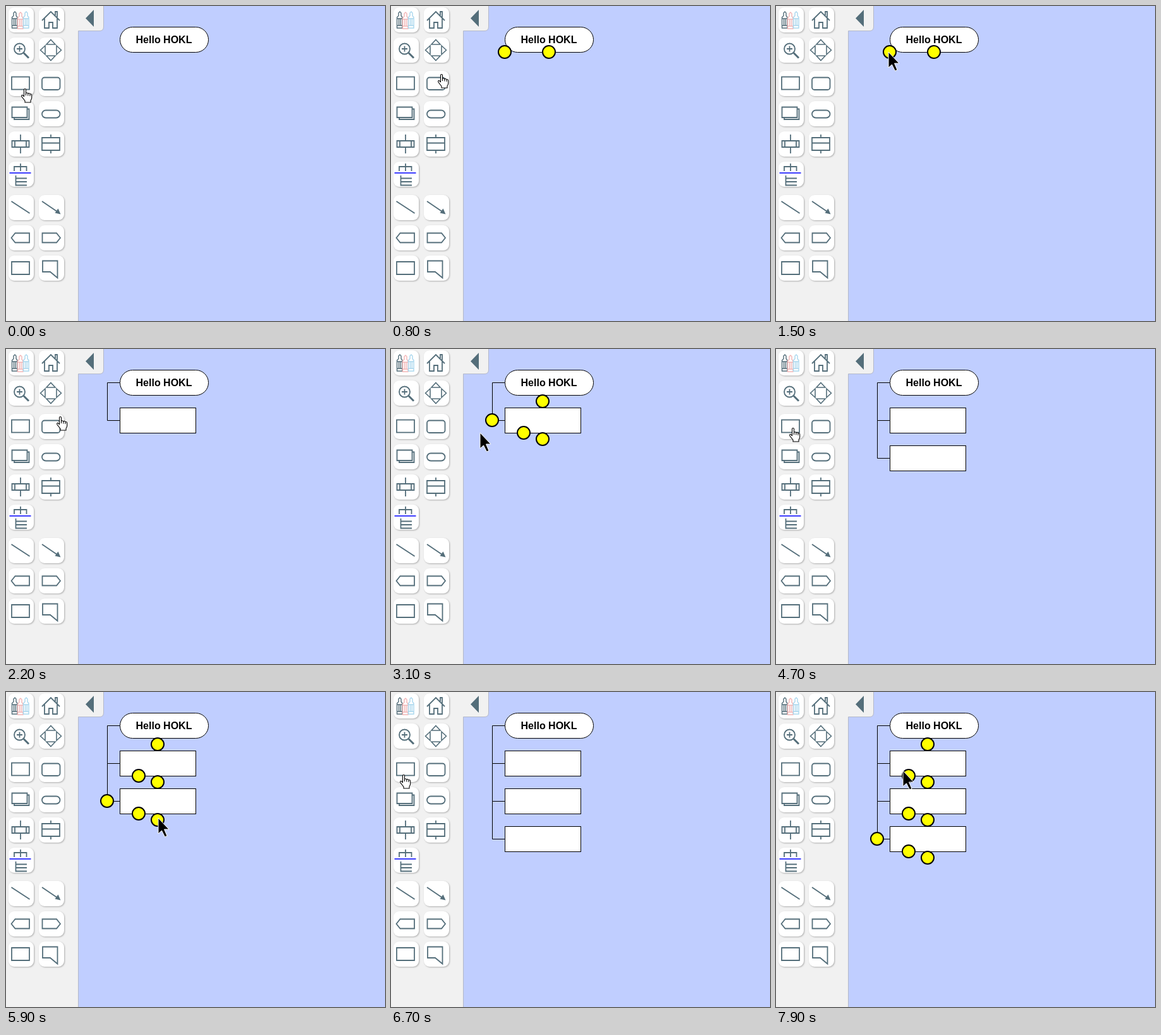
An HTML page that plays this animation: 600x500 px, repeating every 8000 ms.

```html
<!DOCTYPE html>
<html lang="en">
<head>
<meta charset="utf-8">
<title>Diagram editor</title>
<style>
  html, body { margin: 0; width: 100%; height: 100%; overflow: hidden; background: #c0ceff; }
  svg { display: block; }
  .button { fill: #fff; filter: drop-shadow(1px 1px 1.2px rgba(0, 0, 0, .28)); }
  .icons { fill: none; stroke: #546e7a; stroke-width: 1.8; }
  .node { fill: #fff; stroke: #000; }
  .link { fill: none; stroke: #000; }
  .spot { fill: #ff0; stroke: #000; stroke-width: 2; }
  text { font: bold 16px "Liberation Sans", Arial, sans-serif; text-anchor: middle; }
</style>
</head>
<body>
<svg width="600" height="500" viewBox="0 0 600 500">
  <rect width="600" height="500" fill="#c0ceff"/>
  <path d="M0 0H154.5V33Q154.5 39.5 148 39.5H114.5V500H0Z" fill="#f1f1f1"/>
  <path d="M154.5 0V33Q154.5 39.5 148 39.5H114.5V500" fill="none" stroke="#b4b8c8"/>
  <path d="M139 6V33L126 19.5Z" fill="#546e7a"/>
  <g id="buttons"></g>

  <g class="icons">
    <g stroke-width="1.4">
      <path id="crayon" d="M9.5 35V18L12 15.5V11L14 9L16 11V15.5L18 18V35ZM9.5 20H18M9.5 31H18M12.5 20V31M15.2 20V31"/>
      <use href="#crayon" x="9" y="1" stroke="#f3b6b6"/>
      <use href="#crayon" x="18" stroke="#a9d7ee"/>
    </g>
    <path d="M57 23L71 9L85 23M61 20V35H68V26H74V35H81V20M78 15V9H81V18"/>
    <g>
      <circle cx="21.500" cy="68" r="8.500"/>
      <path d="M17 68H26M21.500 63.500V72.500"/>
      <path d="M28 74.500L36 82.500" stroke-width="3"/>
    </g>
    <path d="M71 53.500L78 61H64ZM71 86.500L78 79H64ZM54.500 70L62 63V77ZM87.500 70L80 63V77Z" stroke-width="1.600"/>
    <rect x="9" y="112.500" width="28" height="20"/>
    <rect x="57" y="113.500" width="28.500" height="19.500" rx="4"/>
    <path d="M9.500 160.500H33.500V177H9.500ZM33.500 163.500H36.500V180H13V177"/>
    <rect x="57" y="165.500" width="28.500" height="12" rx="6"/>
    <path d="M9.500 214H36.500V224H9.500ZM14 214V224M32 214V224M23 204V214M23 224V234"/>
    <path d="M57 209H85V229H57ZM57 217.500H85M71 204V209M71 229V234"/>
    <path d="M23 250V262M13 262V255H32.500V262M15.500 269V284.500H33M15.500 273.500H33M15.500 279H33"/>
    <path d="M5.500 265H39.500" stroke="#3d3dff"/>
    <path d="M8.500 310L37.500 329M57 310L82 327"/>
    <path d="M86.500 330.500L77.500 328.500L82.500 321.500Z" fill="#546e7a" stroke="none"/>
    <path d="M8.500 368L14.500 360.500H37V375.500H14.500ZM86 368L80 360.500H57.500V375.500H80Z"/>
    <path d="M9 406H37V426H9ZM58 404.500H81.500V431.500L70 422H58Z"/>
  </g>

  <g id="diagram"></g>

  <path id="arrow" d="M0 0V25L5.500 20L10.500 30L14 28.500L9.500 18H17Z" fill="#000" stroke="#fff" stroke-width="1"/>
  <path id="hand" d="M-1.500 13V2Q-1.500 .5 0 .5T1.500 2V7.500Q3.200 5.800 4.800 8Q6.500 6.500 8 8.700Q10.700 8 10.700 11V15Q10.500 17 9 19V22H0V19.500L-5 13Q-6 10.500-4 10.300Q-2.500 11-1.500 13ZM1.500 7.500V11M4.800 8V11.500M8 8.700V12" fill="#fff" stroke="#000" stroke-width="1.100"/>
</svg>
<script>
const LOOP = 8000, STEP = 100;
const byId = id => document.getElementById(id);

const buttons = [2, 50, 103, 151, 199, 247, 300, 348, 396]
  .flatMap((y, row) => (row === 5 ? [4] : [4, 52]).map(x => ({ x, y })));
byId('buttons').innerHTML = buttons
  .map(({ x, y }) => `<rect class="button" x="${x}" y="${y}" width="40" height="40" rx="9"/>`).join('');

// Pointer positions: time, x, y
const pointerKeys = [
  [0, 30, 131], [300, 27, 127], [400, 27, 127], [1400, 178, 73], [1600, 177, 73],
  [2600, 36, 126], [2700, 36, 126], [3500, 246, 140], [3700, 246, 140],
  [4700, 27, 125], [4900, 27, 126], [5800, 241, 200], [6000, 241, 200],
  [6700, 20, 131], [6900, 20, 130], [7900, 201, 125], [8000, 201, 125]
];
const boxTimes = [1700, 3800, 6100];
const pickTimes = [500, 2800, 5000, 7000];
const countPassed = (times, t) => times.filter(time => t >= time).length;

function pointerAt(t) {
  const i = pointerKeys.findIndex(key => key[0] > t);
  const [t0, x0, y0] = pointerKeys[i - 1], [t1, x1, y1] = pointerKeys[i];
  const p = (t - t0) / (t1 - t0), eased = p * p * (3 - 2 * p);
  return { x: Math.round(x0 + (x1 - x0) * eased), y: Math.round(y0 + (y1 - y0) * eased) };
}

const spot = (x, y) => `<circle class="spot" cx="${x}" cy="${y}" r="10"/>`;

function diagram(boxes, picking) {
  let shapes = '', spots = boxes ? spot(240, 83) : spot(180, 73) + spot(250, 73);
  for (let i = 1; i <= boxes; i++) {
    const mid = 53.5 + 60 * i;
    shapes += `<path class="link" d="M180 ${mid - 60}H160.5V${mid}H180"/>`
      .replace(`M180 ${mid - 60}H160.5`, i > 1 ? `M160.5 ${mid - 60}` : `M180 ${mid - 60}H160.5`)
      + `<rect class="node" x="180.5" y="${mid - 20}" width="120" height="40"/>`;
    spots += spot(210, mid + 19.5) + spot(240, mid + 29.5);
  }
  if (boxes) spots += spot(160, 53 + 60 * boxes);
  return shapes + '<rect class="node" x="180.5" y="33.5" width="140" height="40" rx="20"/>'
    + '<text x="250" y="59">Hello HOKL</text>' + (picking ? spots : '');
}

let shown = '';
function draw(now) {
  const t = Math.floor(now % LOOP / STEP) * STEP;
  const boxes = countPassed(boxTimes, t);
  const markup = diagram(boxes, countPassed(pickTimes, t) > boxes);
  if (markup !== shown) byId('diagram').innerHTML = shown = markup;

  const { x, y } = pointerAt(t);
  const onButton = buttons.some(b => x >= b.x && x <= b.x + 40 && y >= b.y && y <= b.y + 40);
  for (const [id, visible] of [['hand', onButton], ['arrow', !onButton]]) {
    byId(id).setAttribute('transform', `translate(${x} ${y})`);
    byId(id).setAttribute('visibility', visible ? 'visible' : 'hidden');
  }
}

const start = performance.now();
function tick() {
  draw(performance.now() - start);
  requestAnimationFrame(tick);
}
tick();
</script>
</body>
</html>
```
